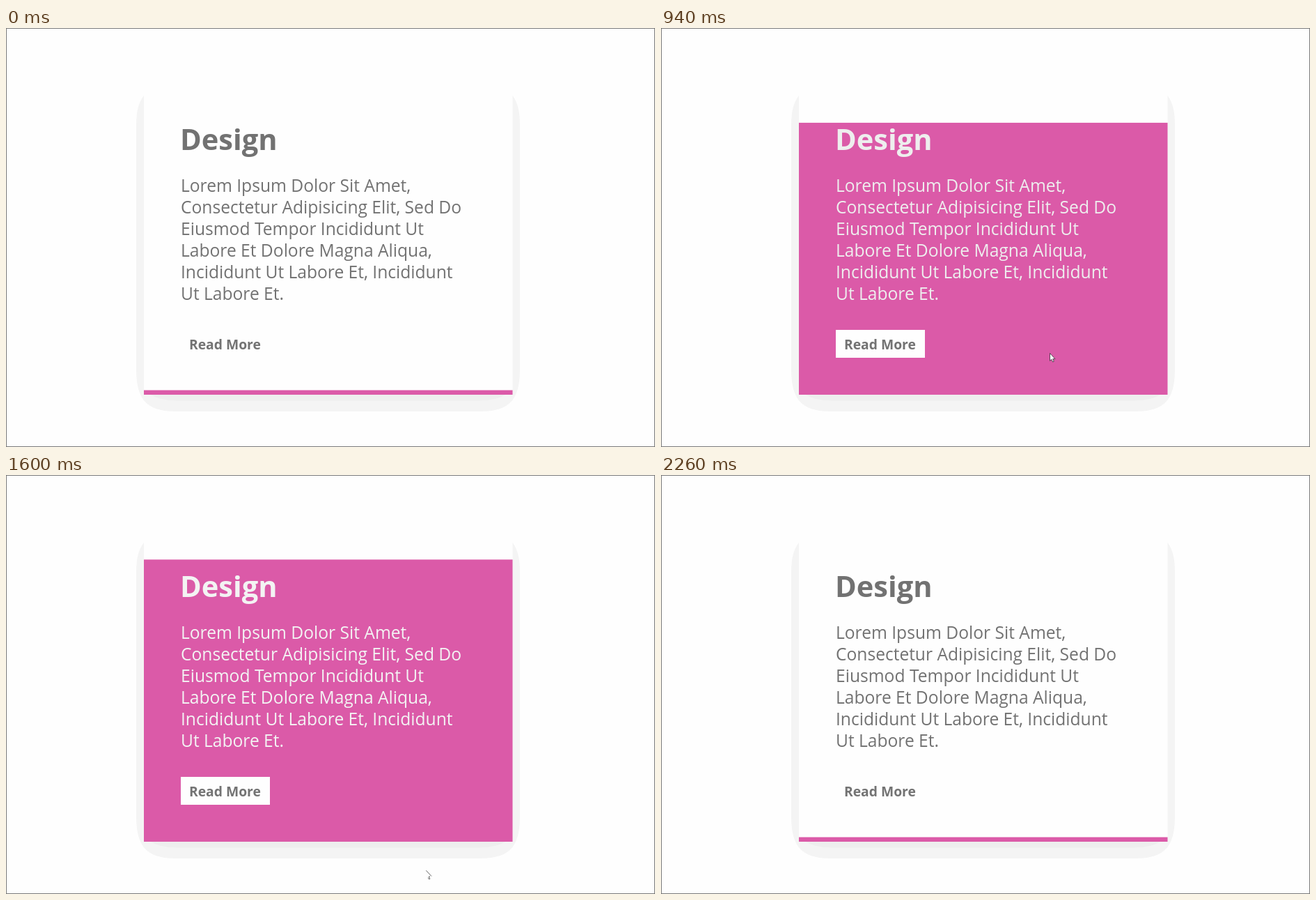
An HTML page that plays this animation: 932x601 px, repeating every 2510 ms.

```html
<!DOCTYPE html>
<html lang="en">
<head>
<meta charset="utf-8">
<title>Hover card</title>
<style>
  html, body { margin: 0; width: 100%; height: 100%; overflow: hidden; background: #fefefe; }
  svg { display: block; width: 932px; height: 601px; }
  text { font-family: "Open Sans", "Noto Sans", sans-serif; }
  .title { font-size: 41.6px; font-weight: 700; }
  .body { font-size: 24.6px; }
  .label { font-size: 19.3px; font-weight: 700; fill: #737373; }
</style>
</head>
<body>
<svg viewBox="0 0 932 601">
  <rect width="932" height="601" fill="#fefefe"/>
  <path fill="#f4f4f4" d="M198 97C190 107 187 120 187 140V488C187 532 200 550 245 550H680C725 550 738 532 738 488V140C738 120 735 107 727.5 97Z"/>
  <path fill="#eeeeee" d="M208 526Q222 534.5 245 534.5H680Q703 534.5 717 526Z"/>
  <rect x="198" y="87" width="529.5" height="439" fill="#fefefe"/>
  <rect id="fill" x="198" width="529.5" fill="#db5aa8"/>
  <rect x="251" y="433" width="128" height="40" fill="#fefefe"/>
  <g id="copy">
    <text class="title" x="250" y="175.3">Design</text>
    <g id="lines" class="body"></g>
  </g>
  <text class="label" x="263" y="461">Read More</text>
  <g id="pointer" stroke-linejoin="round">
    <path id="arrow" d="M.5 .5V11.5L2.8 9.3L4.6 13L6.3 12.2L4.7 8.7H8Z" fill="#fff" stroke="#4a3a48" stroke-width=".9"/>
    <path id="outline" d="M.3 .3L8 8.5M6 9H4.2L5.8 12.3L4.4 12.8L3.2 10.6" fill="none" stroke="#555" stroke-width=".9"/>
  </g>
  <rect x=".5" y=".5" width="931" height="600" fill="none" stroke="#7a7a7a"/>
</svg>
<script>
const LOOP = 2510, LEAD = 250, CADENCE = 134, TICK = 30;
const CARD_TOP = 87, CARD_BOTTOM = 526, BAR_TOP = 519.5;
const $ = id => document.getElementById(id);

const copyLines = [
  "Lorem Ipsum Dolor Sit Amet,",
  "Consectetur Adipisicing Elit, Sed Do",
  "Eiusmod Tempor Incididunt Ut",
  "Labore Et Dolore Magna Aliqua,",
  "Incididunt Ut Labore Et, Incididunt",
  "Ut Labore Et."
];
$("lines").innerHTML = copyLines
  .map((line, i) => `<text x="251" y="${235 + i * 31}">${line}</text>`).join("");

const clamp = v => Math.max(0, Math.min(1, v));
const bezier = (a, b, u) => 3 * a * u * (1 - u) ** 2 + 3 * b * u * u * (1 - u) + u ** 3;

// The CSS "ease" curve.
function ease(x) {
  if (x <= 0 || x >= 1) return clamp(x);
  let low = 0, high = 1;
  for (let i = 0; i < 24; i++) {
    const mid = (low + high) / 2;
    if (bezier(.25, .25, mid) < x) low = mid; else high = mid;
  }
  return bezier(.1, 1, low);
}

// The picture is held at an even cadence, with changes snapped to clock ticks.
function stepAt(time) {
  const snapped = Math.floor((time - LEAD) / TICK) * TICK;
  return Math.ceil((snapped + 20) / CADENCE) - 1;
}

const glide = (from, to, u, power) => from + (to - from) * u ** power;

// The pointer climbs onto the card, drops off it, then leaves to the right.
function pointerAt(step) {
  if (step <= 6) {
    const u = step / 6;
    return [glide(513, 582, u, 2.3), glide(576, 429, u, 1.58)];
  }
  if (step <= 10) {
    const u = (step - 6) / 4;
    return [glide(582, 603, u, 3), glide(429, 567, u, 3)];
  }
  const u = (step - 10) / 4;
  return [glide(603, 887, u, 2.87), glide(567, 592, u, 1)];
}

function draw(time) {
  const step = stepAt(time);
  const t = LEAD + step * CADENCE;
  const hover = ease((t - 679) / 400) - ease((t - 1543) / 525);
  const top = BAR_TOP + (CARD_TOP - BAR_TOP) * hover;
  $("fill").setAttribute("y", top);
  $("fill").setAttribute("height", CARD_BOTTOM - top);

  const grey = Math.round(114 + 140 * hover);
  $("copy").setAttribute("fill", `rgb(${grey},${grey},${grey})`);

  const visible = step >= 0 && step <= 14;
  $("pointer").style.display = visible ? "" : "none";
  if (!visible) return;
  const [x, y] = pointerAt(step).map(Math.round);
  const onFill = y >= top && y < CARD_BOTTOM;
  $("pointer").setAttribute("transform", `translate(${x} ${y})`);
  $("arrow").style.display = onFill ? "" : "none";
  $("outline").style.display = onFill ? "none" : "";
}

const start = performance.now();
function tick() {
  draw((performance.now() - start) % LOOP);
  requestAnimationFrame(tick);
}
tick();
</script>
</body>
</html>
```
